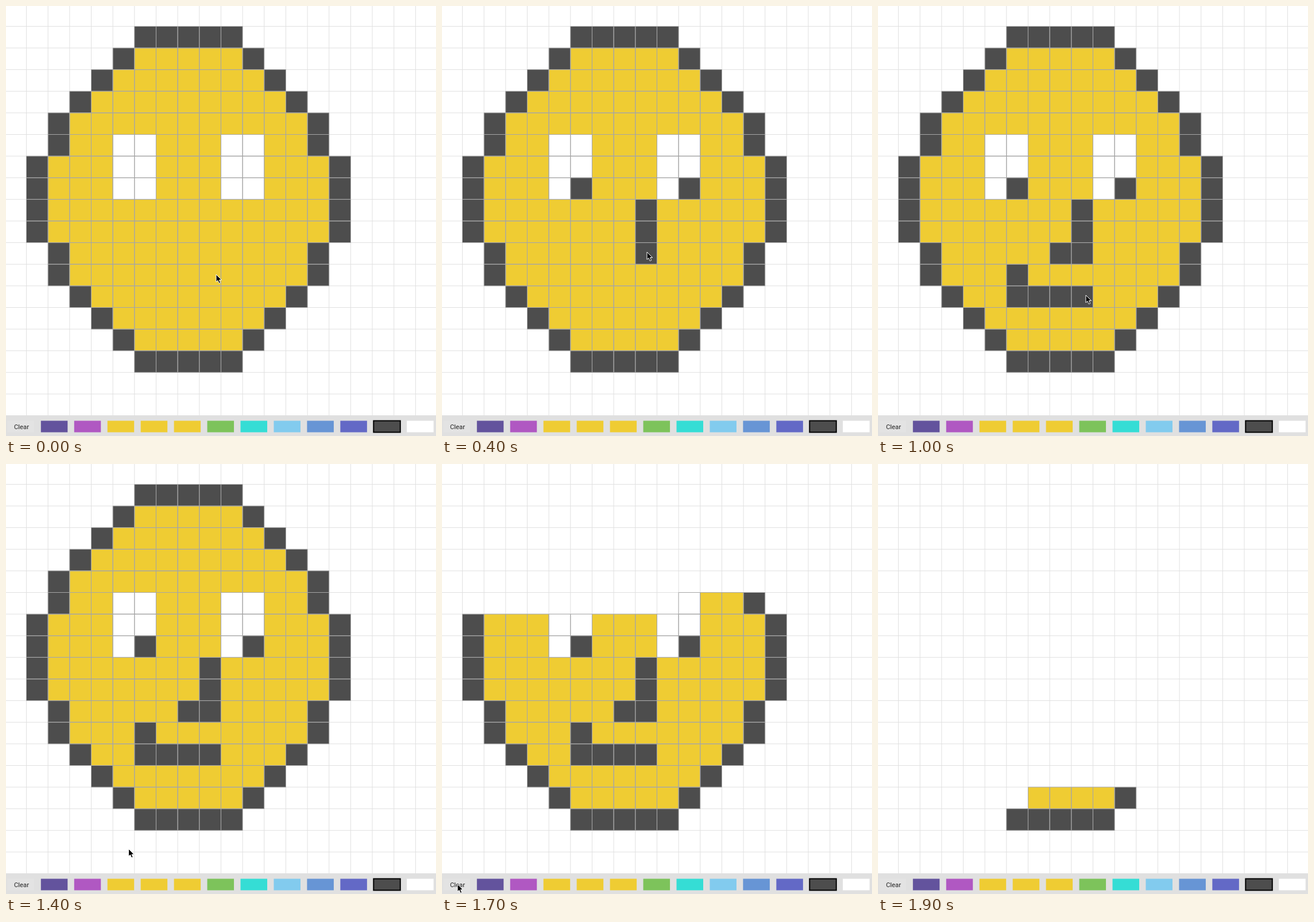
An HTML page for the animation above (2 s loop, 749 by 748 pixels).

```html
<!DOCTYPE html>
<html lang="en">
<head>
<meta charset="utf-8">
<title>Pixel painter</title>
<style>
  html, body { margin: 0; width: 100%; height: 100%; overflow: hidden; background: #fff; }
  svg { display: block; }
  text { font: 11.3px Roboto, Arial, sans-serif; text-anchor: middle; fill: #222; }
</style>
</head>
<body>
<svg id="stage" width="749" height="748" viewBox="0 0 749 748"></svg>
<script>
const LOOP = 2000, STEP = 100;
const COLS = 20, ROWS = 16, WIDTH = 15;
const PRESS = 16, LEAVE = 19;
const YELLOW = '#efcc33', DARK = '#4d4d4d', WHITE = '#ffffff';
const PALETTE = ['#63539d', '#b058c2', YELLOW, YELLOW, YELLOW, '#7dc35b',
  '#35ddd5', '#82cbee', '#6795d5', '#6369c6', DARK, WHITE];

// Pointer key points: time in steps, x, y. A stroke paints the cells it crosses.
const STROKES = [
  [[1, 240, 318]],
  [[2, 430, 316]],
  [[3, 355, 356], [4, 357, 428], [5, 320, 432]],
  [[7, 240, 470], [8, 245, 507], [10, 362, 503]]
];
const PATH = [
  [0, 366, 467], ...STROKES.flat(), [12, 400, 608], [13, 400, 608], [15, 27, 731], [LOOP / STEP, 27, 731]
];

const stage = document.getElementById('stage');
const gridX = i => 35.5 + 37.66 * i;
const gridY = i => 35.4 + 37.62 * i;
const cellIndex = (col, row) => row * COLS + col;

function add(tag, attrs) {
  const el = document.createElementNS(stage.namespaceURI, tag);
  for (const key in attrs) el.setAttribute(key, attrs[key]);
  return stage.appendChild(el);
}

const box = (x, y, width, height, fill, extra) =>
  add('rect', { x, y, width, height, fill, ...extra });

function pointerAt(t) {
  const next = PATH.findIndex(key => key[0] > t);
  const [t0, x0, y0] = PATH[next - 1], [t1, x1, y1] = PATH[next];
  const k = (t - t0) / (t1 - t0);
  return [x0 + (x1 - x0) * k, y0 + (y1 - y0) * k];
}

// Maps each painted cell to the step at which the pointer reaches it.
function paintTimes() {
  const times = new Map();
  for (const stroke of STROKES) {
    const first = stroke[0][0] * 20, last = stroke[stroke.length - 1][0] * 20;
    for (let n = first; n <= last; n++) {
      const [x, y] = pointerAt(n / 20);
      const cell = cellIndex(Math.floor((x - gridX(0)) / 37.66), Math.floor((y - gridY(0)) / 37.62));
      if (!times.has(cell)) times.set(cell, Math.ceil(n / 20));
    }
  }
  return times;
}

function inset(row) {
  const depth = Math.min(row, ROWS - 1 - row);
  return Math.max(5 - depth, depth < 6 ? 1 : 0);
}

function baseColor(col, row) {
  const side = Math.min(col, WIDTH - 1 - col);
  if (side === inset(row) || row % (ROWS - 1) === 0) return DARK;
  const eye = row >= 5 && row <= 7 && (side === 4 || col === 5 || col === 9);
  return eye ? WHITE : YELLOW;
}

// Clearing runs row by row and speeds up.
function wiped(step) {
  const n = step - PRESS - 1;
  return n < 0 ? 0 : 110 + 66 * n + 11 * n * n;
}

let grid = '';
for (let i = 0; i < 19; i++) grid += `M${gridX(i)} 0V712M0 ${gridY(i)}H749`;
add('path', { d: grid, stroke: '#e0e0e0', fill: 'none' });

const times = paintTimes(), cells = [];
for (let row = 0; row < ROWS; row++) {
  for (let col = inset(row); col < WIDTH - inset(row); col++) {
    const x = gridX(col), y = gridY(row), w = gridX(col + 1) - x, h = gridY(row + 1) - y;
    const base = baseColor(col, row), index = cellIndex(col, row);
    cells.push({
      el: box(x, y, w, h, base), base, index,
      paintAt: times.get(index) ?? Infinity,
      outline: `M${x} ${y}h${w}v${h}h${-w}z`
    });
  }
}
const outlines = add('path', { stroke: '#a6a6a6', fill: 'none' });

box(0, 712, 749, 36, '#e0e0e0');
const button = box(2.5, 721.5, 46.5, 20, '#e3e3e3');
add('text', { x: 27, y: 736 }).textContent = 'Clear';
PALETTE.forEach((color, i) => {
  const frame = color === DARK ? { stroke: '#000', 'stroke-width': 2 } : {};
  box(60.8 + 57.95 * i, 721.5, 46.5, 20, color, frame);
});

const pointer = add('path', {
  d: 'M0 0V13L3 10.4L5.2 15.4L7.6 14.4L5.5 9.6H9.6Z',
  fill: '#000', stroke: '#fff'
});

function draw(step) {
  const [x, y] = pointerAt(step);
  let edges = '';
  for (const { el, base, index, paintAt, outline } of cells) {
    const visible = index >= wiped(step);
    el.setAttribute('fill', step >= paintAt ? DARK : base);
    el.setAttribute('visibility', visible ? 'visible' : 'hidden');
    if (visible) edges += outline;
  }
  outlines.setAttribute('d', edges);
  button.setAttribute('fill', step === PRESS ? '#c4c4c4' : '#e3e3e3');
  pointer.setAttribute('transform', `translate(${x} ${y})`);
  pointer.setAttribute('visibility', step < LEAVE ? 'visible' : 'hidden');
}

const start = performance.now();
let shown = -1;
function tick() {
  const step = Math.floor((performance.now() - start) % LOOP / STEP);
  if (step !== shown) draw(shown = step);
  requestAnimationFrame(tick);
}
tick();
</script>
</body>
</html>
```
